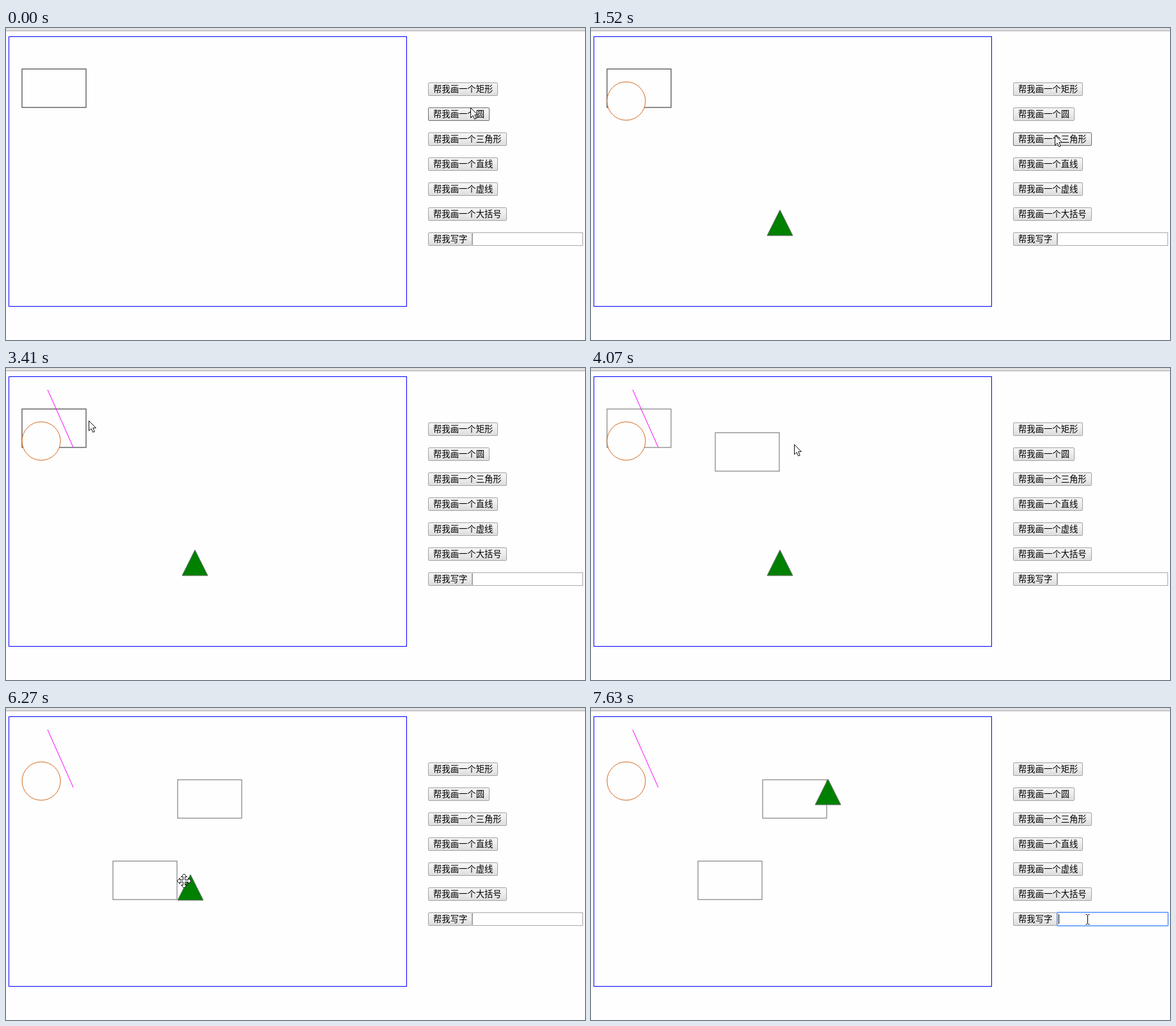
An HTML page that plays this animation: 904x487 px, repeating every 8 s.

```html
<!DOCTYPE html>
<html lang="zh">
<head>
<meta charset="utf-8">
<title>画图</title>
<style>
  html, body { margin: 0; width: 100%; height: 100%; overflow: hidden; background: #fefefe; }
  svg { display: block; width: 904px; height: 487px; }
  text { font: 13.333px "Noto Sans CJK SC", "Noto Sans CJK", sans-serif; }
  .box { fill: none; stroke: dimgray; }
  .pointer { fill: #fff; stroke: #111; }
</style>
</head>
<body>
<svg viewBox="0 0 904 487">
  <defs>
    <linearGradient id="face" x1="0" y1="0" x2="0" y2="1">
      <stop offset="0" stop-color="#f5f5f5"/>
      <stop offset=".4" stop-color="#efefef"/>
      <stop offset="1" stop-color="#dcdcdc"/>
    </linearGradient>
  </defs>
  <rect width="904" height="487" fill="#fefefe"/>
  <rect width="904" height="4" fill="#e1e1e1"/>
  <rect y="4" width="904" height="1" fill="#a8a8a8"/>
  <rect x="4.5" y="13.5" width="621" height="421" fill="none" stroke="blue"/>

  <rect id="boxB" class="box" x="25" y="64" width="100" height="60"/>
  <rect id="boxA" class="box" x="25" y="64" width="100" height="60"/>
  <circle id="circle" cx="55" cy="114" r="30" fill="#fefefe" stroke="chocolate"/>
  <path id="triangle" d="M295 284L275 324H315Z" fill="green" stroke="dimgray"/>
  <path id="line" d="M65 34L105 124" stroke="magenta"/>

  <g id="buttons"></g>
  <rect x="728.5" y="319.5" width="172" height="20" fill="#fff" stroke="#a9a9a9"/>
  <g id="focus">
    <rect x="728" y="319" width="173" height="21" rx="1" fill="#fff" stroke="#4d90fe" stroke-opacity=".75" stroke-width="2"/>
    <path d="M730.5 322V337" stroke="#000"/>
  </g>

  <g id="cursor">
    <path id="arrow" class="pointer" d="M.5 .5V16L4.2 12.6L6.6 18.3L9.2 17.2L6.8 11.6H11.4Z"/>
    <path id="move" class="pointer"/>
    <path id="beam" d="M-2.5 -7.5H-.5L.5 -6.5L1.5 -7.5H3.5M.5 -6.5V6.5M-2.5 7.5H-.5L.5 6.5L1.5 7.5H3.5" fill="none" stroke="#000"/>
  </g>
</svg>
<script>
const LOOP = 8000, FIRST = 120, BEAT = 135.5;   // the screen refreshes once per beat
const $ = id => document.getElementById(id);

// Pointer waypoints: beat, x, y
const route = [
  [2, 725, 124], [7, 724, 167], [10, 724, 167], [18, 727, 229], [19, 727, 250], [24, 129, 82],
  [26, 120, 78], [28, 289, 115], [29, 317, 119], [31, 363, 126], [35, 107, 88], [38, 220, 254],
  [39, 249, 263], [43, 295, 310], [44, 288, 286], [45, 278, 270], [47, 355, 130], [49, 355, 130],
  [50, 370, 137], [54, 775, 330]
];
const drags = [
  { id: "boxA", grab: 26, drop: 31 },
  { id: "boxB", grab: 35, drop: 39 },
  { id: "triangle", grab: 43, drop: 50 }
];
const appear = { circle: 0, triangle: 9, line: 17, focus: 55 };
const input = { x: 728, y: 319, width: 173, height: 21 };

// Buttons are as wide as their label
const labels = ["矩形", "圆", "三角形", "直线", "虚线", "大括号"].map(s => "帮我画一个" + s).concat("帮我写字");
const buttons = labels.map((text, i) =>
  ({ text, x: 659, y: 85 + 39 * i, width: Math.ceil(13.35 * text.length + 15.5), height: 21 }));
$("buttons").innerHTML = buttons.map(b =>
  `<rect x="${b.x + .5}" y="${b.y + .5}" width="${b.width - 1}" height="20" rx="1.5" fill="url(#face)"/>
   <text x="${b.x + 8}" y="${b.y + 15}">${b.text}</text>`).join("");
const faces = $("buttons").querySelectorAll("rect");

// One arm of the move cursor, turned four times
const arm = [[-1.5, -1.5], [-1.5, -6.5], [-4.5, -6.5], [0, -11], [4.5, -6.5], [1.5, -6.5]];
const turn = ([x, y], n) => n ? turn([-y, x], n - 1) : [x, y];
$("move").setAttribute("d", "M" + [0, 1, 2, 3].flatMap(n => arm.map(p => turn(p, n))).join("L") + "Z");

function pointer(beat) {
  const i = route.findIndex(k => k[0] > beat);
  if (i === 0) return route[0].slice(1);
  if (i < 0) return route[route.length - 1].slice(1);
  const [b0, x0, y0] = route[i - 1], [b1, x1, y1] = route[i];
  const p = (beat - b0) / (b1 - b0);
  return [Math.round(x0 + (x1 - x0) * p), Math.round(y0 + (y1 - y0) * p)];
}

// A dragged shape trails the pointer by one beat
function offset({ grab, drop }, beat) {
  const [x0, y0] = pointer(grab);
  const [x, y] = pointer(Math.max(grab, Math.min(beat - 1, drop)));
  return [x - x0, y - y0];
}

const inside = ([x, y], box, pad = 0) =>
  x >= box.x - pad && x < box.x + box.width + pad && y >= box.y - pad && y < box.y + box.height + pad;
const place = (id, [x, y]) => $(id).setAttribute("transform", `translate(${x} ${y})`);
const show = (id, on) => $(id).setAttribute("visibility", on ? "visible" : "hidden");

function draw(time) {
  const beat = Math.floor((time - FIRST) / BEAT);
  const at = pointer(beat);
  let shape = inside(at, input) ? "beam" : "arrow";

  for (const drag of drags) {
    const [dx, dy] = offset(drag, beat);
    place(drag.id, [dx, dy]);
    const held = beat >= drag.grab - 1 && beat <= drag.drop;
    if (held && inside([at[0] - dx, at[1] - dy], $(drag.id).getBBox(), 15)) shape = "move";
  }

  place("cursor", at);
  for (const id of ["arrow", "move", "beam"]) show(id, id === shape);
  for (const id in appear) show(id, beat >= appear[id]);
  buttons.forEach((b, i) => faces[i].setAttribute("stroke", inside(at, b) ? "#6e6e6e" : "#a3a3a3"));
}

const start = performance.now();
function tick() {
  draw((performance.now() - start) % LOOP);
  requestAnimationFrame(tick);
}
tick();
</script>
</body>
</html>
```
